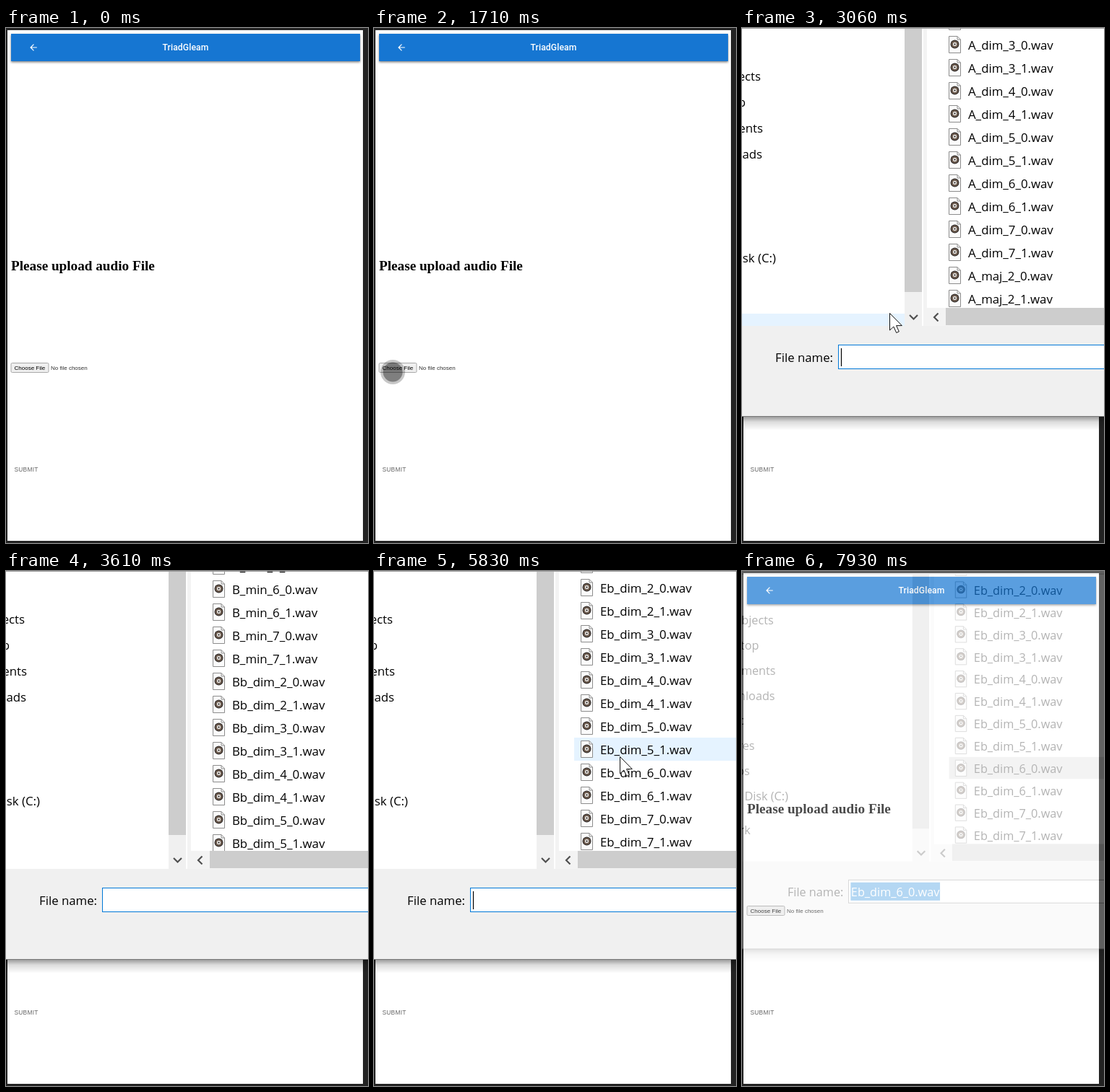
An HTML page that plays this animation: 501 px wide and 714 px high, repeating every 8000 ms.

```html
<!DOCTYPE html>
<html lang="en">
<head>
<meta charset="utf-8">
<title>Audio upload</title>
<style>
  html, body { margin: 0; width: 100%; height: 100%; overflow: hidden; background: #222; }
  svg { display: block; width: 501px; height: 714px; }
  .ui { font: 16.8px "Open Sans", "Noto Sans", sans-serif; fill: #000; }
  .form { font: 8px "Liberation Sans", Arial, sans-serif; }
</style>
</head>
<body>
<svg viewBox="0 0 501 714">
  <defs>
    <linearGradient id="shade" x2="0" y2="1">
      <stop offset="0" stop-opacity=".42"/>
      <stop offset=".4" stop-opacity=".14"/>
      <stop offset="1" stop-opacity="0"/>
    </linearGradient>
    <filter id="drop" x="-5%" y="-20%" width="110%" height="150%">
      <feDropShadow dx="0" dy="1.5" stdDeviation="1.6" flood-opacity=".5"/>
    </filter>
    <clipPath id="listClip"><path d="M256 1H720V388H256Z"/></clipPath>
    <g id="wav">
      <path d="M286.5 4.5h11.5l4.5 4.5v18.500h-16z" fill="#fbfbfb" stroke="#8c8c8c"/>
      <path d="M298 4.500v4.500h4.500" fill="none" stroke="#8c8c8c"/>
      <circle cx="294.500" cy="15.500" r="6" fill="#3b3533"/>
      <circle cx="294.500" cy="15.500" r="4" fill="none" stroke="#a58467" stroke-width=".8"/>
      <circle cx="294.500" cy="15.500" r="2.700" fill="#f4eee8"/>
      <circle cx="294.500" cy="15.500" r="1.200" fill="#444"/>
    </g>
  </defs>

  <rect width="501" height="714" fill="#232323"/>
  <rect x="2" y="3" width="492" height="708" fill="#fff"/>
  <rect x="7" y="8" width="483" height="38" fill="#1976d2" filter="url(#drop)"/>
  <path transform="translate(30.8 19.800) scale(.6)" fill="#fff"
    d="M20 11H7.830l5.590-5.590L12 4l-8 8 8 8 1.410-1.410L7.830 13H20z"/>
  <text x="248.500" y="31" text-anchor="middle" fill="#fff"
    style="font:500 12.200px Roboto,sans-serif;letter-spacing:.1px">TriadGleam</text>
  <text x="7" y="336" style="font:bold 19.200px 'Liberation Serif',Times,serif">Please upload audio File</text>
  <rect id="choose" x="7" y="464.500" width="52" height="13" rx="1.500" stroke="#a8a8a8"/>
  <text class="form" x="11.500" y="474">Choose File</text>
  <text class="form" x="62" y="474" fill="#333">No file chosen</text>
  <text class="form" x="11.500" y="615" fill="#666" style="font-size:8.400px;letter-spacing:.24px">SUBMIT</text>

  <g id="touch">
    <circle r="17" fill="#000" fill-opacity=".22"/>
    <circle id="touchCore" r="13.500" fill="#000"/>
  </g>

  <g id="dialog">
    <rect x="-120" y="538" width="900" height="20" fill="url(#shade)"/>
    <rect x="-120" y="-60" width="900" height="598.500" fill="#f0f0f0" stroke="#777"/>
    <rect x="-120" y="1" width="345" height="412" fill="#fff"/>
    <rect id="sideHover" x="-120" y="396" width="345" height="17" fill="#e5f3ff"/>
    <path d="M-120 .5H720" stroke="#a0a0a0"/>
    <path d="M225 1h24v365h-24z" fill="#cdcdcd"/>
    <path d="M249 1h471v412H249z" fill="#fff"/>
    <path d="M251 1h5v412h-5zM256 388h464v25H256z" fill="#f3f3f3"/>
    <path d="M282 388h438v24H282z" fill="#cdcdcd"/>
    <path d="M232 398l5.500 5.500 5.500-5.500M271.500 395.500l-5.500 5.500 5.500 5.500"
      fill="none" stroke="#505050" stroke-width="2.200"/>
    <g id="sidebar" class="ui" text-anchor="end"></g>
    <g clip-path="url(#listClip)">
      <rect id="hover" x="277" width="440" height="32" fill="#e5f3ff"/>
      <rect id="picked" x="277.500" y="263" width="440" height="31.500"/>
      <g id="list" class="ui"></g>
    </g>
    <text class="ui" x="46" y="463">File name:</text>
    <rect id="field" x="133.500" y="439.500" width="586" height="33" fill="#fff"/>
    <rect id="marked" x="136.500" y="443" width="128" height="26" fill="#0078d7"/>
    <text id="fileName" class="ui" x="137" y="463">Eb_dim_6_0.wav</text>
    <path id="caret" d="M137.500 444v25" stroke="#000" stroke-width="1.200"/>
  </g>

  <path id="arrow" d="M.5.5V24l5.300-5 3.900 8.500 3.600-1.600-3.700-8.300h7.700z" fill="#fff" stroke="#111"/>
</svg>
<script>
const LOOP = 8000, ROW = 32, LIST_TOP = 7;
const SVG = 'http://www.w3.org/2000/svg';
const $ = id => document.getElementById(id);
const set = (id, attrs) => { for (const k in attrs) $(id).setAttribute(k, attrs[k]); };
const show = (id, on) => set(id, { visibility: on ? 'inherit' : 'hidden' });
const within = (t, a, b) => t >= a && t < b;
const clamp = v => Math.max(0, Math.min(1, v));

function add(parent, tag, attrs, text = '') {
  const el = document.createElementNS(SVG, tag);
  for (const k in attrs) el.setAttribute(k, attrs[k]);
  el.textContent = text;
  return parent.appendChild(el);
}

// Linear interpolation through [time, ...values] keys.
function along(keys, t) {
  let i = 0;
  while (i < keys.length - 2 && t >= keys[i + 1][0]) i++;
  const [a, b] = [keys[i], keys[i + 1]];
  const p = clamp((t - a[0]) / (b[0] - a[0]));
  return a.slice(1).map((v, k) => v + (b[k + 1] - v) * p);
}

const touchPath = [[510, 352, 627], [720, 260, 558], [850, 200, 536], [950, 158, 527],
  [1100, 80, 506], [1250, 32, 490], [1450, 26, 477]];
const arrowPath = [[2180, 24, 474], [3010, 24, 474], [3011, 204, 395], [3070, 204, 395],
  [3330, 350, 255], [4820, 362, 212], [5420, 340, 257], [5850, 340, 257],
  [6400, 344, 277], [6640, 344, 277], [6760, 352, 300]];
const arrowShown = [[2180, 3400], [4820, 5490], [5560, 6770]];
const scrollPath = [[3200, 64], [3500, 2600], [3810, 5600], [4250, 5600], [4420, 6745], [4550, 9216]];
const hovers = [[3270, 3400, 231], [4820, 5110, 199], [5110, 6030, 231], [6030, 6560, 263], [6700, 6910, 295]];

const roots = ['A', 'Ab', 'B', 'Bb', 'C', 'Cs', 'D', 'E', 'Eb'];
const chords = ['dim', 'maj', 'min'];
const nameOf = i => `${roots[Math.floor(i / 36)]}_${chords[Math.floor(i / 12) % 3]}_${2 + Math.floor(i % 12 / 2)}_${i % 2}.wav`;

[['3D Objects', 67, 26], ['Desktop', 103, 5], ['Documents', 139, 29], ['Downloads', 175, 28],
 ['Music', 211, -16], ['Pictures', 247, -1], ['Videos', 283, -8], ['Local Disk (C:)', 319, 47],
 ['Network', 368, -7]].forEach(([label, y, x]) => add($('sidebar'), 'text', { x, y: y + 6 }, label));

const rows = Array.from({ length: 14 }, () => {
  const g = add($('list'), 'g', {});
  add(g, 'use', { href: '#wav' });
  return { g, label: add(g, 'text', { x: 313, y: 23 }) };
});

function drawList(t) {
  const stepped = Math.floor((t - 4420) / 65) * 65 + 4420;
  const scroll = along(scrollPath, stepped)[0];
  const first = Math.max(0, Math.floor((scroll - LIST_TOP) / ROW));
  rows.forEach(({ g, label }, k) => {
    const i = first + k;
    g.setAttribute('transform', `translate(0 ${Math.round(LIST_TOP + i * ROW - scroll)})`);
    label.textContent = nameOf(i);
  });
}

function drawDialog(t) {
  const closing = t >= 7800;
  const away = closing ? clamp((t - 7750) / 180) : 1 - clamp((t - 2260) / 220);
  const scale = 1 - .034 * away;
  show('dialog', t >= 2320);
  set('dialog', {
    opacity: 1 - (closing ? .71 : 1) * away,
    transform: `translate(${545 * (1 - scale)} ${112 * (1 - scale)}) scale(${scale})`
  });
  show('sidebar', t >= 2450);
  show('list', t >= 2590);
  show('sideHover', within(t, 3010, 3150));

  const hover = hovers.find(([a, b]) => within(t, a, b));
  show('hover', !!hover);
  if (hover) set('hover', { y: hover[2] });

  const chosen = t >= 6560;
  show('picked', chosen);
  set('picked', { fill: closing ? '#d9d9d9' : '#cce8ff', stroke: closing ? 'none' : '#99d1ff' });
  show('fileName', chosen);
  set('fileName', { style: closing ? 'fill:#fff' : '' });
  show('marked', closing);
  const pointed = within(t, 6900, 7190) || within(t, 7520, 7660);
  set('field', { stroke: !chosen ? '#0078d7' : pointed ? '#171717' : '#7a7a7a' });
  show('caret', within(t, 2630, 6560) && Math.floor((t - 2630) / 530) % 2 === 0);
  drawList(t);
}

function draw(t) {
  show('touch', within(t, 510, 2180));
  set('touch', { transform: `translate(${along(touchPath, t)})` });
  set('touchCore', { 'fill-opacity': within(t, 1710, 1920) ? .36 : .22 });
  set('choose', { fill: within(t, 1920, 2320) ? '#e5e5e5' : '#efefef' });
  drawDialog(t);
  show('arrow', arrowShown.some(([a, b]) => within(t, a, b)));
  set('arrow', { transform: `translate(${along(arrowPath, t).map(Math.round)})` });
}

const start = performance.now();
function tick() {
  draw((performance.now() - start) % LOOP);
  requestAnimationFrame(tick);
}
tick();
</script>
</body>
</html>
```
